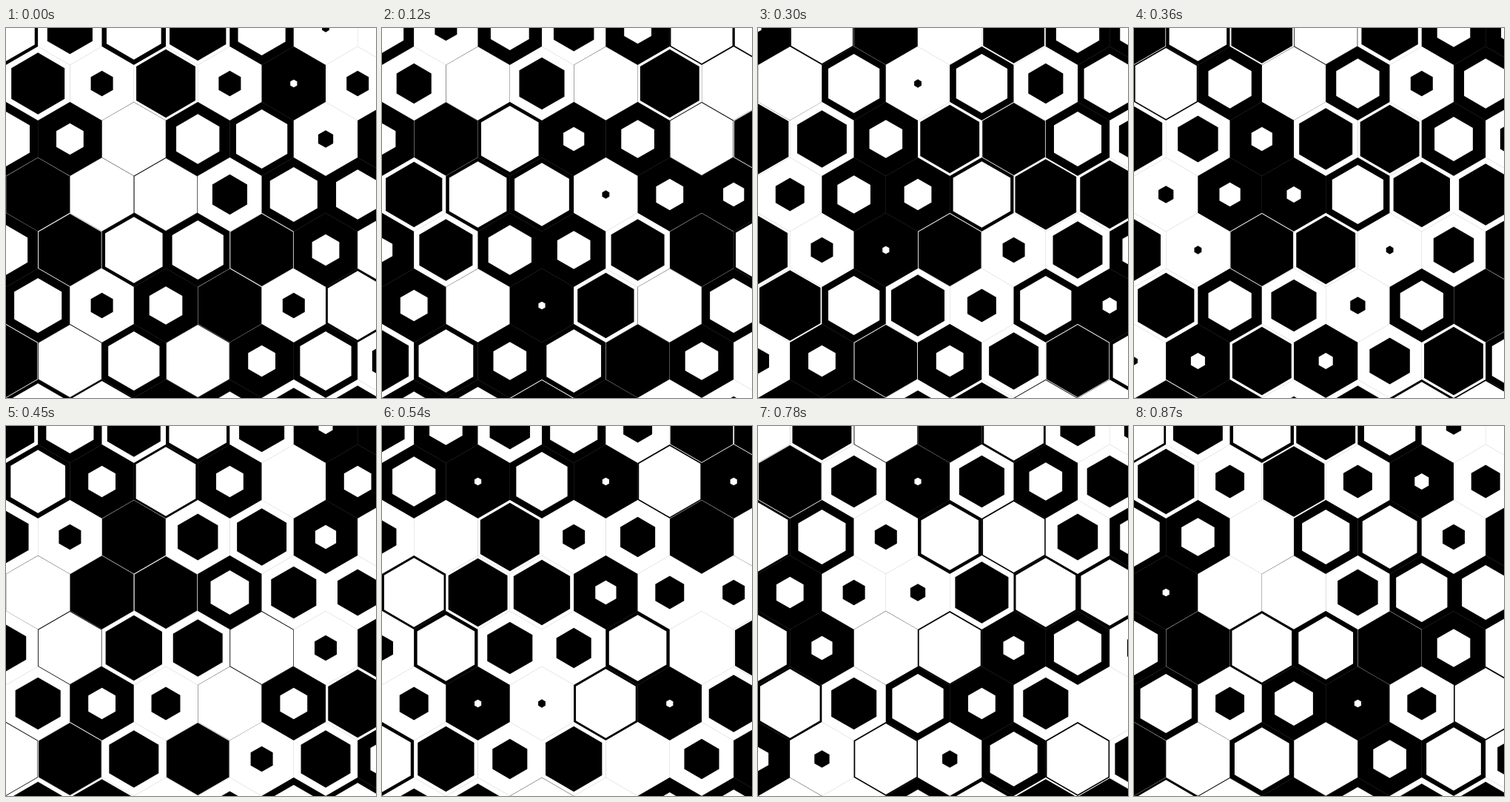
Animation of 500x500 px, one loop 0.9 s. Source, as an HTML page with a canvas:

```html
<!DOCTYPE html>
<html lang="en">
<head>
<meta charset="utf-8">
<title>Hexagon pulse</title>
<style>
  html, body { margin: 0; width: 100%; height: 100%; overflow: hidden; background: #fff; }
  canvas { display: block; width: 500px; height: 500px; }
</style>
</head>
<body>
<canvas id="stage" width="500" height="500"></canvas>
<script>
const ctx = document.getElementById('stage').getContext('2d');
const STEP = 30, COUNT = 30;
const PITCH = 86.4, ROW = 75, RADIUS = 50;

// Phase of each cell in steps; odd rows sit half a cell to the right.
const phases = [
  [19, 7, 20, 4, 22, 13, 13],
  [5, 11, 3, 11, 29, 11],
  [22, 26, 15, 23, 21, 12, 27],
  [0, 15, 16, 9, 22, 23],
  [23, 1, 19, 21, 1, 26, 14],
  [22, 11, 25, 0, 11, 18],
  [1, 16, 21, 16, 26, 21, 9],
  [19, 17, 27, 23, 6, 5]
];

function hexagon(x, y, r, color) {
  if (r <= 0) return;
  const w = r / RADIUS * PITCH / 2;
  ctx.fillStyle = color;
  ctx.beginPath();
  ctx.moveTo(x, y - r);
  ctx.lineTo(x + w, y - r / 2);
  ctx.lineTo(x + w, y + r / 2);
  ctx.lineTo(x, y + r);
  ctx.lineTo(x - w, y + r / 2);
  ctx.lineTo(x - w, y - r / 2);
  ctx.fill();
}

// Black shrinks away over white, then white over black, both easing in.
function cell(x, y, n) {
  const black = n < 15;
  const u = black ? (n + 1) / 15 : (n - 14) / 16;
  const r = RADIUS * (1 - u * u) - 0.8 * u;
  hexagon(x, y, RADIUS, black ? '#fff' : '#000');
  hexagon(x, y, r, black ? '#000' : '#fff');
}

function draw() {
  const step = Math.floor(performance.now() / STEP) % COUNT;
  // Mid grey leaves faint seams between cells of either colour.
  ctx.fillStyle = '#808080';
  ctx.fillRect(0, 0, 500, 500);
  phases.forEach((row, j) => row.forEach((p, i) =>
    cell((i + (j % 2) / 2) * PITCH, j * ROW, (p + step) % COUNT)));
  requestAnimationFrame(draw);
}
draw();
</script>
</body>
</html>
```
